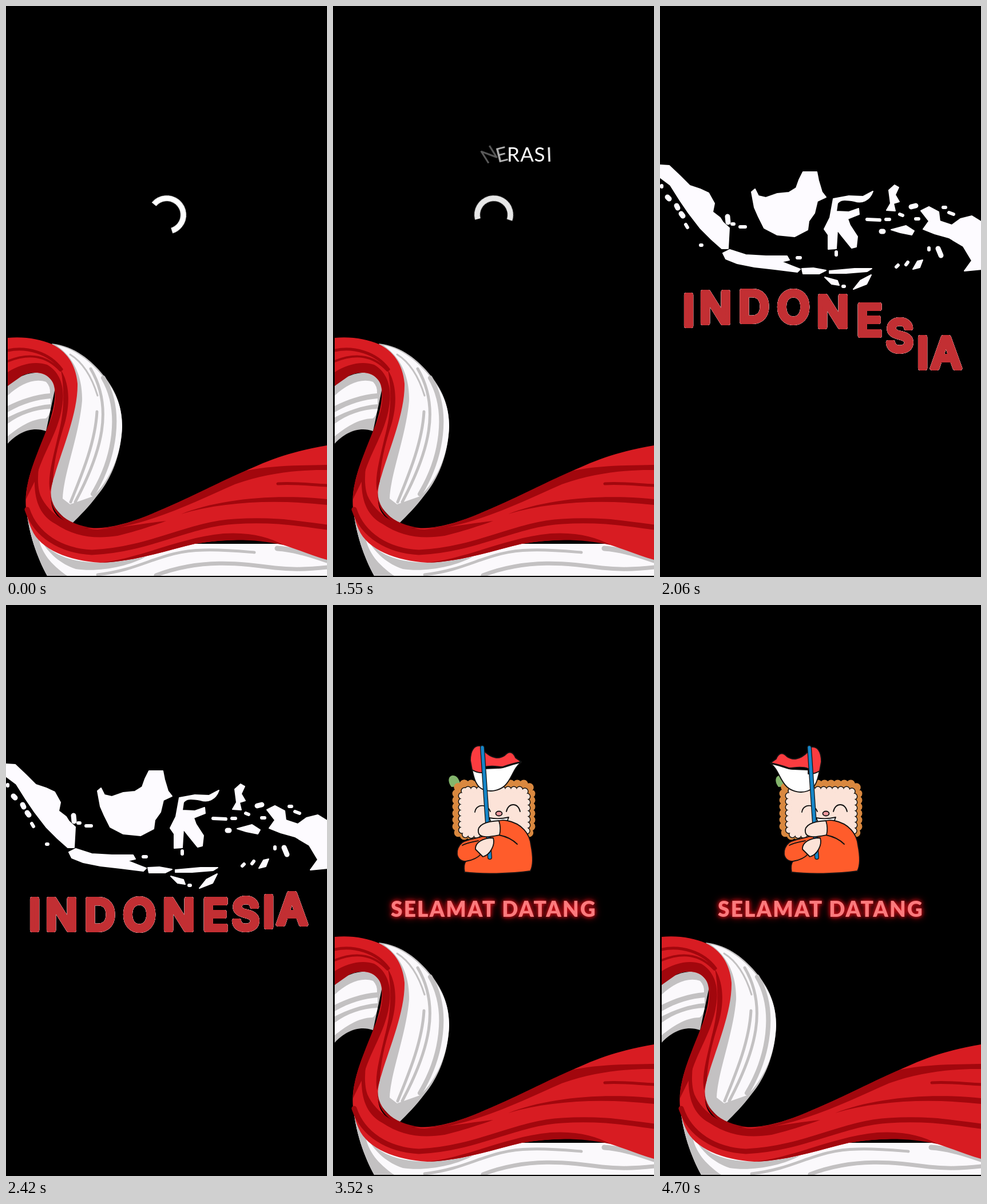
These frames come from a looping animation (561x998 px, 4.73 s). An HTML page:

```html
<!DOCTYPE html>
<html lang="id">
<head>
<meta charset="utf-8">
<title>Selamat datang</title>
<style>
  html, body { margin: 0; width: 100%; height: 100%; overflow: hidden; background: #000; }
  svg { display: block; width: 100%; height: 100%; }
  text { text-anchor: middle; font-family: Lato, "Open Sans", sans-serif; }

  .ribbon, .map, .intro, .welcome, .spin, .ring, .in, .out, .rise, .greet {
    animation: 4730ms linear infinite both;
  }

  /* Scenes: intro, map, welcome */
  .ribbon { animation-name: ribbon; animation-timing-function: step-end; }
  .map { animation-name: map; animation-timing-function: step-end; }
  .intro { animation-name: intro; animation-timing-function: step-end; }
  .welcome { animation-name: welcome; animation-timing-function: step-end; }
  @keyframes ribbon { 0% { opacity: 1 } 35.73% { opacity: 0 } 53.91%, 100% { opacity: 1 } }
  @keyframes map { 0% { opacity: 0 } 35.73% { opacity: 1 } 53.91%, 100% { opacity: 0 } }
  @keyframes intro { 0% { opacity: 1 } 35.73%, 100% { opacity: 0 } }
  @keyframes welcome { 0% { opacity: 0 } 53.91%, 100% { opacity: 1 } }

  .spin { animation-name: spin; }
  .ring { animation-name: ring; fill: none; stroke: #fff; stroke-width: 10; stroke-dasharray: 213 360; }
  @keyframes spin { from { transform: rotate(219deg) } to { transform: rotate(2251deg) } }
  @keyframes ring {
    0%, 9.5% { opacity: 1 }
    12.7%, 23.3% { opacity: 0 }
    26.4%, 32.6% { opacity: 1 }
    34.7%, 100% { opacity: 0 }
  }

  /* Letters roll in one by one and roll back out */
  .word { font-size: 35px; fill: #fff; }
  .in { animation-name: in; animation-delay: calc(var(--i) * 95ms); }
  .out { animation-name: out; animation-delay: calc(var(--i) * 18ms); }
  @keyframes in {
    0%, 11.63% { opacity: 0; transform: translateX(20px) rotate(-54deg) }
    19.03%, 100% { opacity: 1; transform: none }
  }
  @keyframes out {
    0%, 31.35% { opacity: 1; transform: none }
    32.41%, 100% { opacity: 0; transform: translateX(16px) rotate(-50deg) }
  }

  .country text {
    font: 500 74px Inter, "Open Sans", sans-serif;
    fill: #c22f33; stroke: #c22f33; stroke-width: 8; stroke-linejoin: round;
  }
  .country { filter: drop-shadow(0 0 .6px #fff) drop-shadow(0 0 .3px #fff); }
  .rise { animation-name: rise; animation-delay: calc(var(--i) * 46ms); }
  @keyframes rise {
    0%, 37% { transform: translateY(65px); animation-timing-function: cubic-bezier(.3, 2, .7, 1) }
    45.88%, 100% { transform: none }
  }

  .greet {
    animation-name: greet; font-size: 37px; font-weight: 900; letter-spacing: 2.2px; fill: #fb7a7d;
    filter: drop-shadow(0 0 3px #e0101a) drop-shadow(0 0 6px #a00810);
  }
  @keyframes greet {
    0%, 57.5% { opacity: 0; transform: translateX(-84px); animation-timing-function: cubic-bezier(.33, .66, .66, 1) }
    61.5% { opacity: .55 }
    64.7%, 100% { opacity: 1; transform: none }
  }

  /* Six flag swings per loop, four held poses each */
  .pose { animation: pose 788.333ms step-end infinite both; }
  @keyframes pose { 0% { visibility: visible } 25%, 100% { visibility: hidden } }

  .ink { stroke: #111; stroke-width: 1.8; stroke-linejoin: round; stroke-linecap: round; }
  .none { fill: none; }
  .red { fill: #d81c22; } .white { fill: #fbf9fc; } .grey { fill: #c3c1c2; } .dark { fill: #a2070d; }
  .folds { fill: none; stroke: #a2070d; stroke-width: 6; stroke-linecap: round; }
  .shade { fill: none; stroke: #c3c1c2; stroke-width: 6; stroke-linecap: round; }
  .cloth { fill: #ff5c2b; } .skin { fill: #fce3d8; } .flag1 { fill: #fb3c40; } .flag0 { fill: #fff; }
</style>
</head>
<body>
<svg viewBox="0 0 561 998">
  <defs>
    <clipPath id="frame"><path d="M3 500H561V996H3Z"/></clipPath>

    <g id="head">
      <path d="M207 318C200 309 201 299 209 298C217 297 221 306 224 317Z" fill="#83b56c"/>
      <rect x="216" y="313" width="130" height="90" rx="14" fill="#d9883f" stroke="#d9883f"
            stroke-width="15" stroke-linecap="round" stroke-dasharray="0 11.5"/>
      <g stroke-linecap="round" stroke-dasharray="0 10">
        <rect x="225" y="323" width="114" height="79" rx="11" stroke="#111" stroke-width="13"/>
        <rect x="225" y="323" width="114" height="79" rx="11" fill="#fce3d8" stroke="#fce3d8" stroke-width="10"/>
      </g>
      <g class="ink none">
        <path d="M248 362C250 347 270 347 275 361M303 361C306 345 324 345 327 361"/>
      </g>
      <ellipse class="ink" cx="290" cy="364.500" rx="5.500" ry="4" fill="#f19a9f"/>
    </g>

    <g id="furl" class="ink">
      <path class="flag0" d="M243 287C246 302 250 319 264 323C275 327 290 325 300 316C313 304 315 285 329 275C310 278 300 286 288 285Z"/>
      <path class="flag1" d="M261 247C246 243 240 255 240 272L243 288Q252 294 263 293V284C276 279 288 283 296 283C308 279 318 276 329 274L319 267C314 254 306 256 300 263C290 270 277 268 264 255Z"/>
    </g>

    <g id="hug">
      <path class="cloth ink" d="M230 467C228 458 230 451 232 448C214 448 212 426 226 415C240 406 262 410 275 395C280 378 290 374 305 377C330 382 344 400 346 420C350 440 350 455 345 465C310 470 260 471 230 467Z"/>
      <path class="ink none" d="M226 420C236 415 246 414 254 412M232 448C246 446 254 441 260 434M290 402C305 405 315 411 322 418"/>
    </g>
    <g id="hands" class="skin ink">
      <path d="M254 397C252 385 266 378 290 377Q294 390 291 402C275 405 256 409 254 397Z"/>
      <path d="M249 427C248 415 262 407 280 407C284 420 274 437 262 440Z"/>
    </g>

    <g id="wave">
      <path class="cloth ink" d="M232 470C227 464 228 459 229 457C211 452 211 426 225 418C245 406 290 402 332 398C346 404 350 432 350 460C340 468 260 474 232 470Z"/>
      <path class="ink none" d="M268 404C288 401 306 404 320 407M256 433C278 428 300 430 320 432"/>
      <g class="ink">
        <path class="flag1" d="M205 283C240 283 265 253 320 253C335 254 340 268 345 277C320 275 300 285 280 300C260 316 240 315 213 317Z"/>
        <path class="flag0" d="M213 317C240 315 258 317 280 300C300 285 325 274 345 277L361 308C330 305 310 315 290 328C265 345 245 350 221 349Z"/>
      </g>
      <path class="ink none" style="stroke-width:8" d="M202 282L254 466"/>
      <path class="none" stroke="#2d83cb" stroke-width="5.500" stroke-linecap="round" d="M202 282L254 466"/>
      <g class="skin ink">
        <path d="M233 422C229 410 242 403 266 404Q272 418 268 431C250 434 236 434 233 422Z"/>
        <path d="M224 447C222 436 234 430 254 434Q258 446 252 456C238 460 227 458 224 447Z"/>
      </g>
    </g>

    <g id="grin" class="ink">
      <path d="M269 371Q285 370 301 369C302 396 270 398 269 371Z"/>
      <path class="flag0" d="M269 371L301 369L299 376L271 378Z"/>
      <path class="none" d="M278 394Q287 399 297 393"/>
    </g>
    <path id="teeth" class="ink flag0" d="M273 372Q290 375 307 371L304 379L276 379Z"/>
    <g id="pole" class="none" stroke-linecap="round">
      <path stroke="#111" stroke-width="8" d="M261 249L274 441"/>
      <path stroke="#1686c8" stroke-width="5.500" d="M261 249L274 441"/>
    </g>
  </defs>

  <g class="ribbon">
    <g clip-path="url(#frame)">
      <!-- inner left fold -->
      <path class="grey" d="M3 664C25 640 70 630 88 658L70 743C45 734 20 746 3 765Z"/>
      <path class="white" d="M3 681C25 660 50 650 70 657Q78 665 77 677C50 679 25 688 3 699ZM3 710C30 694 55 688 78 686L78 696C50 698 25 708 3 719ZM3 730C25 714 50 705 78 704C76 714 72 721 68 721C45 721 20 738 3 752Z"/>

      <!-- right white fold -->
      <path class="grey" d="M80 590C120 594 150 620 170 645C195 675 203 705 203 735C201 790 181 830 160 855C145 875 130 890 115 905C95 890 74 870 75 845L110 640Z"/>
      <path class="white" d="M88 593C120 598 148 622 168 646C195 676 203 705 203 735C201 790 178 832 152 857L112 871L99 861C100 820 128 750 133 690C134 650 120 615 88 593Z"/>
      <g class="shade">
        <path d="M170 650C204 708 190 790 152 853" stroke-width="8"/>
        <path d="M148 634C188 702 168 778 121 867" stroke-width="5"/>
        <path d="M159 709C156 765 130 825 113 867" stroke-width="5"/>
        <path d="M112 609C138 625 152 655 160 681" stroke-width="3"/>
      </g>

      <!-- lower white edge -->
      <path class="white" d="M35 870C38 920 55 965 72 996H561V940H300L100 930Z"/>
      <path class="grey" d="M35 870C38 920 55 965 72 996H107C78 976 62 955 57 930Z"/>
      <path class="grey" d="M62 935C85 962 115 972 165 973C195 972 220 968 245 962C215 980 160 990 122 984C95 975 75 957 62 935Z"/>
      <g class="shade">
        <path d="M160 994C240 985 270 952 345 951C380 950 410 953 434 955" stroke-width="5"/>
        <path d="M262 995C340 965 410 974 470 982C505 986 535 984 561 981" stroke-width="7"/>
        <path d="M474 948C505 950 535 960 561 969" stroke-width="9"/>
      </g>

      <!-- red ribbon -->
      <path class="red" d="M3 580C30 577 60 582 80 591C105 603 122 625 125 660C126 710 100 770 85 820C76 845 76 870 85 885C95 900 115 912 140 913C200 915 250 890 300 868C350 845 400 820 440 803C480 785 520 775 561 768V968C530 960 500 945 470 938C430 930 380 932 330 940C280 952 220 972 165 973C110 970 60 950 45 915C33 890 32 860 38 835C45 800 65 760 75 730C85 700 90 670 80 655C70 640 50 637 30 645C18 650 10 656 3 664Z"/>
      <g class="dark">
        <path d="M3 640C25 626 50 620 72 627C94 640 104 665 98 700C92 745 62 785 53 825L35 862C34 825 60 770 73 735C90 700 88 670 82 658C72 640 50 636 30 645L3 664Z"/>
        <path d="M96 636C114 665 111 705 100 738C90 770 83 800 82 830L77 848C72 825 82 790 90 755C100 718 104 680 96 636Z"/>
        <path d="M78 850C75 885 105 914 150 913C200 914 250 890 300 868C350 845 390 824 420 812C470 802 520 803 561 802V811C510 810 450 818 400 836C340 862 280 893 205 910C140 922 80 900 78 850Z"/>
        <path d="M165 973C240 964 300 930 380 922C425 919 460 928 485 942C430 930 380 932 330 940C280 952 220 972 165 973Z"/>
        <path d="M306 888C370 862 470 852 561 862V872C470 862 380 866 306 888Z"/>
        <path d="M51 810C46 860 58 890 86 905C120 928 155 932 195 926C228 918 258 908 280 900C235 905 195 913 160 915C115 913 75 890 60 855Q53 835 58 800Z"/>
      </g>
      <g class="folds">
        <path d="M3 602C35 595 75 605 97 635" stroke-width="5"/>
        <path d="M3 621C40 606 70 610 95 637" stroke-width="4"/>
        <path d="M475 835C505 833 535 837 561 838" stroke-width="5"/>
        <path d="M37 880C52 925 95 952 150 955C250 951 320 905 400 901C470 896 520 906 561 911" stroke-width="9"/>
      </g>
    </g>

    <g class="intro">
      <g transform="translate(281 365)"><g class="spin"><circle class="ring" r="29" pathLength="360"/></g></g>
      <g class="word" id="word"></g>
    </g>

    <g class="welcome">
      <g class="pose" style="animation-delay:-363ms">
        <use href="#head" x="-6" y="5"/><use href="#grin"/><use href="#wave"/>
      </g>
      <g class="pose" style="animation-delay:-166ms">
        <use href="#head"/><use href="#teeth"/><use href="#hug"/>
        <use href="#furl" transform="matrix(-1 0 0 1 522 2)"/><use href="#pole"/><use href="#hands"/>
      </g>
      <g class="pose" style="animation-delay:-757ms">
        <use href="#head" x="4" y="5"/><use href="#grin" x="5"/>
        <use href="#wave" transform="matrix(-1 0 0 1 562 0)"/>
      </g>
      <g class="pose" style="animation-delay:-560ms">
        <use href="#head"/><use href="#teeth"/><use href="#hug"/>
        <use href="#furl"/><use href="#pole"/><use href="#hands"/>
      </g>
      <text class="greet" x="281" y="545">SELAMAT DATANG</text>
    </g>
  </g>

  <g class="map">
    <g fill="#fdfbff" stroke="#fdfbff" stroke-width="2" stroke-linejoin="round">
      <path d="M-2 278L16 279L35 297L52 314L70 320L85 327L95 345L92 360L105 370L110 378L121 388L119 424L108 424L90 408L70 388L50 362L35 340L18 313L-2 298Z"/>
      <path d="M110 432L122 426L150 435L185 437L222 437L226 444L212 447L232 455L245 460L240 465L200 460L165 456L135 450L115 442Z"/>
      <path d="M160 325L166 320L172 332L185 335L205 328L225 326L238 318L243 304L250 290L274 290L277 305L283 325L290 334L275 341L270 362L260 376L258 391L235 403L205 400L182 388L172 368L165 352Z"/>
      <path d="M372 324C366 341 352 345 340 341C322 338 315 338 310 345L308 359L330 360L347 354L348 364L328 372L332 383L345 403L343 421L335 423L318 402L310 392L308 424L294 425L294 400L287 390L297 370L303 337L330 332L355 333Z"/>
      <path d="M456 358L470 351L487 360L489 376L510 383L525 372L545 367L563 378V460L532 463L545 445L530 420L505 405L480 398L460 390L470 376Z"/>
      <path d="M400 322L410 313L417 317L411 330L418 342L408 345L411 358L396 357L403 345Z"/>
      <path d="M404 391L430 384L444 393L440 400L420 396Z"/>
      <path d="M248 459L268 458L290 462L278 468L250 468ZM296 463L340 459L370 459L362 464L325 467L296 467Z"/>
      <path d="M288 474L310 480L313 488L300 486ZM338 495L350 480L369 470L361 486ZM442 460L450 446L459 444L454 457Z"/>
    </g>
    <g fill="none" stroke="#fdfbff" stroke-width="9" stroke-linecap="round">
      <path d="M486 424L491 436M387 394H390M118 368L119 378M13 334L16 337M29 349L31 353M37 363L40 367M439 351L447 349"/>
      <path stroke-width="6" d="M362 373L384 374M3 314V316M45 382L48 387M71 418H73M140 386L149 386M126 381H129M240 440L245 440M447 372H452M505 361L513 364M413 456L416 453M430 452L433 448M395 373H401M419 364L424 366M308 430V435M320 490H322M470 423V426M495 352H499"/>
    </g>
    <g class="country" id="country"></g>
  </g>
</svg>
<script>
  // One group per letter; --i sets its delay
  const letters = (id, word, centers, wrap) => {
    document.getElementById(id).innerHTML = [...word].map((c, i) => wrap(c, centers[i], `style="--i:${i}"`)).join('');
  };
  letters('word', 'GENERASI', [207, 234, 262, 290, 315, 339, 361, 377], (c, x, s) =>
    `<g transform="translate(${x} 259)"><g class="in" ${s}><g class="out" ${s}><text y="12.500">${c}</text></g></g></g>`);
  letters('country', 'INDONESIA', [50, 97, 164, 233, 302, 366, 419, 459, 500], (c, x, s) =>
    `<g class="rise" ${s}><text x="${x}" y="568">${c}</text></g>`);
</script>
</body>
</html>
```
